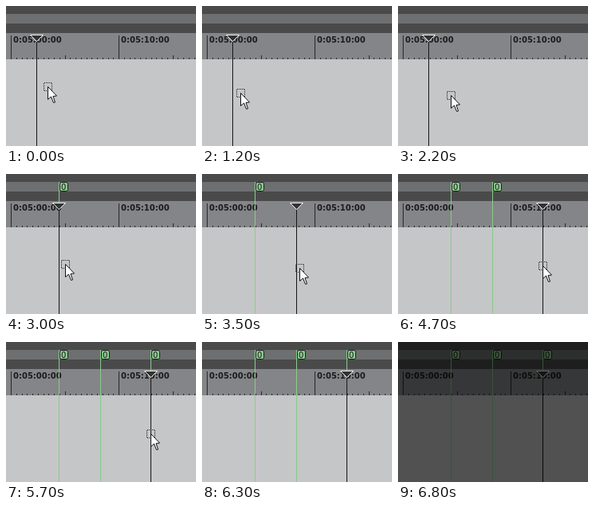
An HTML page with a canvas for the animation above (7 s loop, 238 by 176 pixels).

```html
<!DOCTYPE html>
<html lang="en">
<head>
<meta charset="utf-8">
<title>Timeline markers</title>
<style>
  html, body { margin: 0; width: 100%; height: 100%; overflow: hidden; background: #c5c6c8; }
  canvas { display: block; width: 238px; height: 176px; }
</style>
</head>
<body>
<canvas id="stage" width="238" height="176"></canvas>
<script>
const ctx = document.getElementById('stage').getContext('2d');
const LOOP = 7000, STEP = 100, WIDTH = 238, HEIGHT = 176;
const POINTER_GONE = 6300, DIM_START = 6800;
const GREEN = '#8acb8b', INK = '#1c1c1e';
const ARROW = new Path2D('M0 0V16L4 12.5 7 20 9 19.5 6.5 12 11 11.5Z');

// Each click moves the playhead; a marker is dropped there later.
const clicks = [
  { x: 66, time: 2600, marked: 2800 },
  { x: 118, time: 3500, marked: 4200 },
  { x: 181, time: 4700, marked: 5500 }
];

const pointerHome = { x: 52, y: 101 };
const glides = [
  { start: 700, end: 900, x: 38, y: 108 },
  { start: 1000, end: 1500, x: 66, y: 112 },
  { start: 2900, end: 3300, x: 118, y: 118 },
  { start: 3400, end: 4000, x: 171, y: 118 },
  { start: 4200, end: 4400, x: 181, y: 115 },
  { start: 5900, end: 6200, x: 164, y: 136 }
];

function rect(color, x, y, w, h) {
  ctx.fillStyle = color;
  ctx.fillRect(x, y, w, h);
}

function shape(path, fill, stroke) {
  ctx.fillStyle = fill;
  ctx.fill(path);
  ctx.strokeStyle = stroke;
  ctx.stroke(path);
}

function text(label, x, y, weight) {
  ctx.font = `${weight} 10px "DejaVu Sans", sans-serif`;
  ctx.fillStyle = INK;
  ctx.fillText(label, x, y);
}

function drawBackground() {
  rect('#4a4a4b', 0, 0, WIDTH, 34);
  rect('#6e6f71', 0, 10, WIDTH, 12);
  rect('#848588', 0, 34, WIDTH, 33);
  rect('#c5c6c8', 0, 67, WIDTH, HEIGHT - 67);
  for (let i = 0; i < 35; i++) {
    const height = i % 20 === 0 ? 30 : i % 10 === 0 ? 5 : 2;
    rect('#29292b', Math.round(6 + i * 6.75), 67 - height, 1, height);
  }
  text('0:05:00:00', 9, 46, 'bold');
  text('0:05:10:00', 144, 46, 'bold');
}

function drawMarker(x) {
  rect(GREEN, x, 10, 1, HEIGHT - 10);
  const flag = new Path2D();
  flag.roundRect(x + 1.5, 10.5, 10, 11, 2);
  shape(flag, GREEN, INK);
  text('0', x + 3, 20, 'normal');
}

function drawPlayhead(x) {
  rect('#161617', x, 45, 1, HEIGHT - 45);
  const handle = new Path2D(`M${x - 7.5} 36.5h16l-8 8Z`);
  shape(handle, '#333335', '#f4f4f4');
}

function drawArrow({ x, y }) {
  ctx.save();
  ctx.translate(x, y);
  for (let i = -4; i < 5; i += 2) {
    for (const edge of [-5, 5]) {
      rect(INK, i, edge, 1, 1);
      rect(INK, edge, i, 1, 1);
    }
  }
  ctx.translate(0.5, 0.5);
  ctx.lineJoin = 'round';
  shape(ARROW, '#fff', '#111');
  ctx.restore();
}

function drawTextCursor({ x, y }) {
  rect(INK, x + 2, y - 6, 1, 13);
  for (const edge of [y - 7, y + 7]) {
    rect(INK, x - 1, edge, 3, 1);
    rect(INK, x + 3, edge, 3, 1);
  }
}

function pointerAt(time) {
  let { x, y } = pointerHome;
  for (const glide of glides) {
    const t = Math.min(1, Math.max(0, (time - glide.start) / (glide.end - glide.start)));
    const eased = t * t * (3 - 2 * t);
    x += (glide.x - x) * eased;
    y += (glide.y - y) * eased;
  }
  return { x: Math.round(x), y: Math.round(y) };
}

function draw(time) {
  drawBackground();
  let playhead = 38, marking = false;
  for (const click of clicks) {
    if (time >= click.marked) drawMarker(click.x);
    if (time >= click.time) playhead = click.x;
    marking ||= time >= click.marked - 100 && time < click.marked + 200;
  }
  drawPlayhead(playhead);
  if (time < POINTER_GONE) (marking ? drawTextCursor : drawArrow)(pointerAt(time));
  if (time >= DIM_START) rect('rgba(0, 0, 0, 0.59)', 0, 0, WIDTH, HEIGHT);
}

const startTime = performance.now();
function frame() {
  const time = (performance.now() - startTime) % LOOP;
  draw(Math.floor(time / STEP) * STEP);
  requestAnimationFrame(frame);
}
frame();
</script>
</body>
</html>
```
